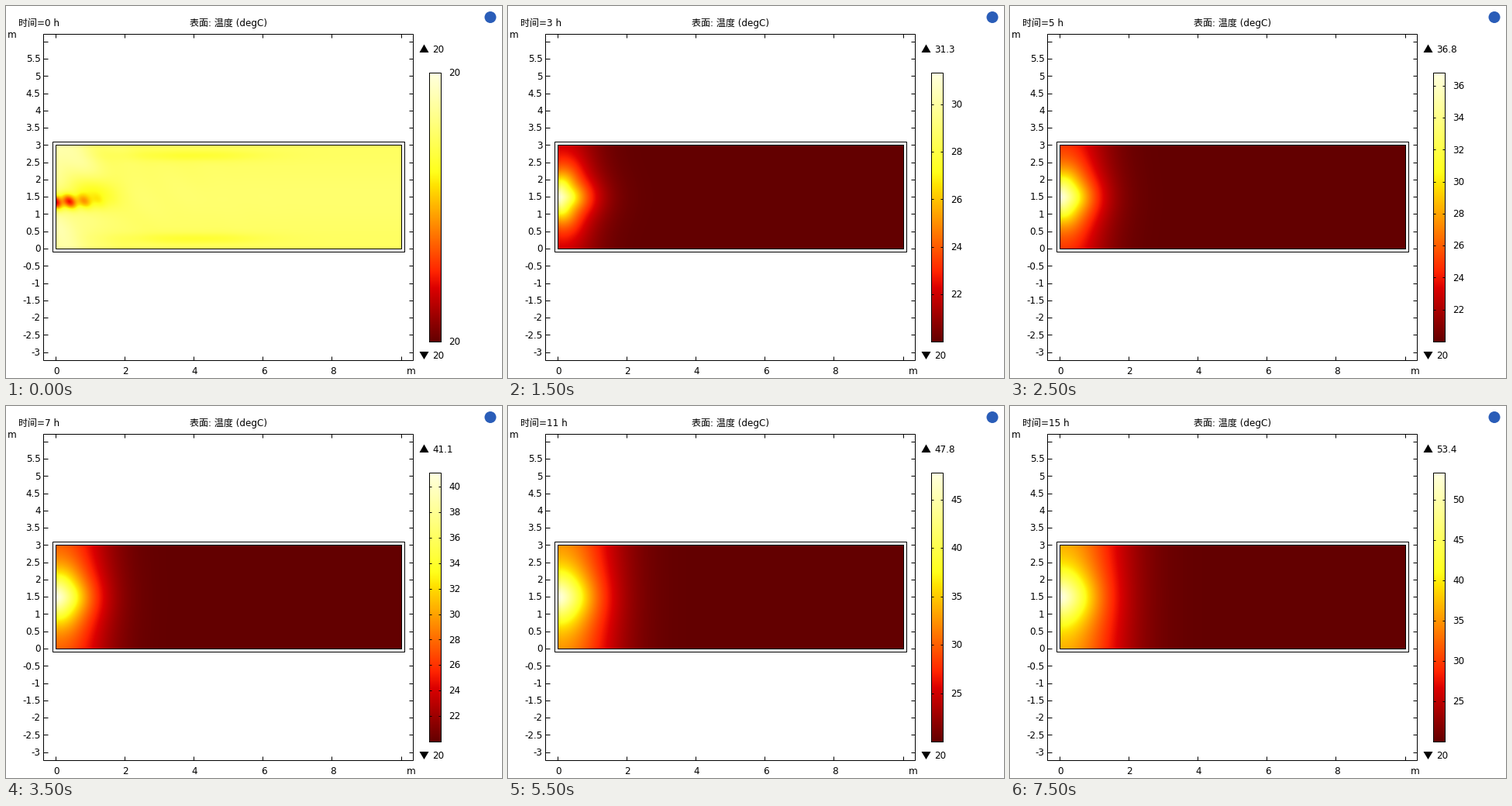
A matplotlib script that plays this animation: 640x480 px, repeating every 8000 ms.

```python
import numpy as np
import matplotlib.pyplot as plt
from matplotlib.animation import FuncAnimation
from matplotlib.collections import LineCollection
from matplotlib.colors import LinearSegmentedColormap
from matplotlib.patches import Circle, Polygon, Rectangle

W, H, DPI = 640, 480, 80
PX = 72 / DPI
FRAMES, INTERVAL = 16, 500

plt.rcParams["font.family"] = ["DejaVu Sans", "Noto Sans CJK JP"]

THERMAL = LinearSegmentedColormap("thermal", {
    "red": [(0, .39, .39), (.26, 1, 1), (1, 1, 1)],
    "green": [(0, 0, 0), (.2, 0, 0), (.63, 1, 1), (1, 1, 1)],
    "blue": [(0, 0, 0), (.58, 0, 0), (1, .88, .88)],
}, N=512)

# Peak rise above 20 degrees at a few hours, nearly linear in sqrt(hour)
RISE_HOURS = [1, 3, 5, 7, 11, 15]
RISE = [3.27, 11.34, 16.82, 21.1, 27.8, 33.37]

gx, gy = np.meshgrid(np.linspace(0, 10, 447), np.linspace(3, 0, 135))
dy = gy - 1.5


def bump(x, y, w, h):
    return np.exp(-((gx - x) / w) ** 2 - ((gy - y) / h) ** 2)


def initial_field():
    """Numerical ripples around the inlet before any heating."""
    rng = np.random.default_rng(4)
    edge_bands = np.exp(-((np.abs(dy) - 1.2) / .16) ** 2 - ((gx - 4) / 2) ** 2)
    corners = np.exp(-(gx / 1.1) ** 2) * (1 - np.exp(-(dy / .55) ** 2))
    jet = bump(0, 1.36, .85, .2) * (.85 + .25 * np.cos(14 * gx + 5 * gy))
    f = .76 + .025 * np.exp(-(dy / .9) ** 2)
    f += .13 * corners - .09 * edge_bands
    f -= .14 * bump(1.1, 1.6, .7, .45) + .6 * jet
    for kx, ky, phase in rng.uniform(1, 6, (5, 3)):
        f += .012 * np.exp(-gx / 1.5) * np.sin(kx * gx + ky * gy + phase)
    return f


def warm_field(hour):
    """Wide layer along the wall plus a round spot at the inlet."""
    level = .52 * (1 - np.exp(-(hour - 1) / 6))
    reach = .55 * hour ** .3
    power = 1.5 - .25 / hour
    r = np.hypot(gx / (.88 - .48 / hour), dy / (.75 - .2 / hour))
    r /= 1 + .15 / hour * np.cos(5 * np.arctan2(dy, gx))
    layer = np.exp(-gx ** 2 / (2 * reach ** 2))
    return level * layer + (1 - level) * np.exp(-r ** power)


def tick_step(rise):
    for limit, step in ((5, .5), (8, 1), (22, 2)):
        if rise < limit:
            return step
    return 5


fig = plt.figure(figsize=(W / DPI, H / DPI), dpi=DPI, facecolor="white")
ax = fig.add_axes([0, 0, 1, 1])
ax.axis("off")


def label(x, y, text="", ha="left"):
    """Text whose digits are centred on y."""
    return ax.text(x, y + 4.1, text, ha=ha, va="baseline", fontsize=12 * PX)


def box(x0, y0, x1, y1):
    ax.add_patch(Rectangle((x0, y0), x1 - x0, y1 - y0, fill=False,
                           ec="black", lw=PX, snap=True, zorder=3))


def lines(segments):
    return ax.add_collection(LineCollection(
        segments, colors="black", linewidths=PX, snap=True, zorder=3))


def heat_image(values, left, top, right, bottom):
    return ax.imshow(values, cmap=THERMAL, vmin=0, vmax=1, aspect="auto",
                     extent=(left, right + 1, bottom + 1, top),
                     interpolation="bilinear")


# Whole numbers snap to the centre of that pixel
LEFT, TOP, RIGHT, BOTTOM = FRAME = 48, 36, 525, 457
BAR_L, BAR_T, BAR_R, BAR_B = BAR = 546, 86, 561, 433
ROOM = 64, 179, 510, 313

field = heat_image(initial_field(), *ROOM)
heat_image(np.linspace(1, 0, 348)[:, None], *BAR)
ax.set_xlim(0, W)
ax.set_ylim(H, 0)

for rect in (FRAME, BAR, ROOM, (60, 175, 514, 317)):
    box(*rect)

ticks = []
for v in range(0, 11, 2):
    x = 64 + 44.55 * v
    ticks += [[(x, TOP), (x, TOP + 5)], [(x, BOTTOM), (x, BOTTOM - 5)]]
    if v < 10:
        label(x + 1.3, 471, str(v), "center")
for v in np.arange(-3, 6.5, .5):
    y = 313 - 44.55 * v
    ticks += [[(LEFT, y), (LEFT + 6, y)], [(RIGHT, y), (RIGHT - 5, y)]]
    if v < 6:
        label(44.5, y + .2, f"{v:g}", "right")
lines(ticks)

label(1.6, 37, "m")
label(517, 471, "m")
label(237.4, 21.5, "表面: 温度 (degC)")
label(550, 451, "20")
clock = label(15.6, 21.5)
peak_label = label(550, 56)
bar_labels = [label(571, 0) for _ in range(12)]
bar_ticks = lines([])

for base, tip in ((60, 49.5), (446, 456)):
    ax.add_patch(Polygon([(533.5, base), (545.5, base), (539.5, tip)],
                         color="black", lw=0))
ax.add_patch(Circle((625, 14.5), 7.5, color="#2a5db8", lw=0))


def update(hour):
    rise = np.interp(np.sqrt(hour), np.sqrt(RISE_HOURS), RISE) if hour else 0
    clock.set_text(f"时间={hour} h")
    peak_label.set_text(f"{round(20 + rise, 1):g}")
    field.set_data(warm_field(hour) if hour else initial_field())

    if hour:
        step = tick_step(rise)
        values = 20 + step * np.arange(1, int(rise / step) + 1)
        marks = [(v, BAR_B - (BAR_B - BAR_T) * (v - 20) / rise) for v in values]
    else:
        marks = [(20, BAR_T), (20, BAR_B)]

    for t in bar_labels:
        t.set_text("")
    for t, (v, y) in zip(bar_labels, marks):
        t.set_text(f"{v:g}")
        t.set_y(y + 4.1)
    bar_ticks.set_segments(
        [[(x, y), (x + d, y)] for _, y in marks
         for x, d in ((BAR_L, 3), (BAR_R, -3))])
    return field, clock, peak_label, bar_ticks, *bar_labels


anim = FuncAnimation(fig, update, frames=FRAMES, interval=INTERVAL, repeat=True)
plt.show()
```
